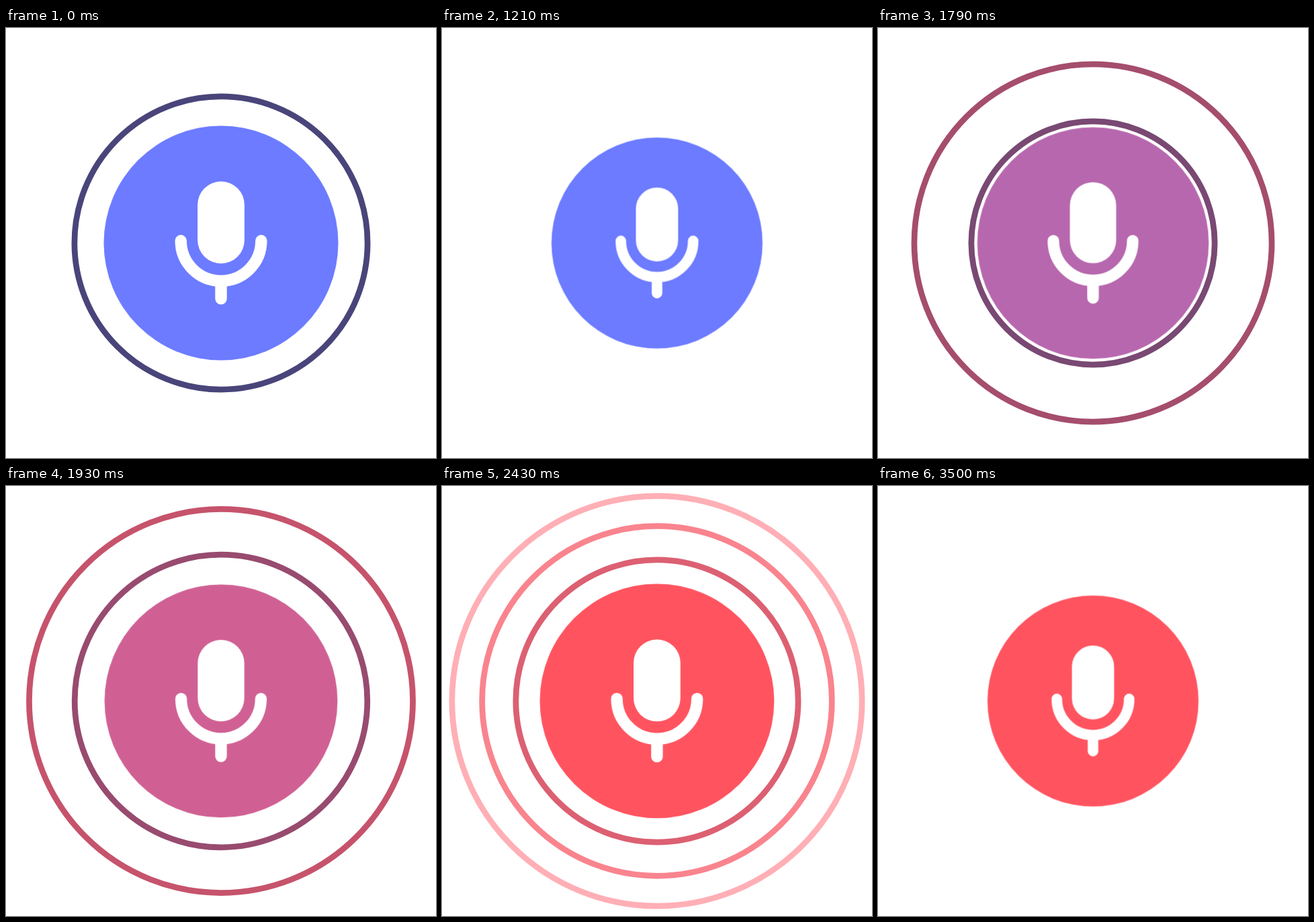
Recreate the animation shown at these times as an HTML page. Size 640 by 640 pixels, loop 3570 ms.

```html
<!DOCTYPE html>
<html lang="en">
<head>
<meta charset="utf-8">
<title>Voice button</title>
<style>
  :root {
    --blue: #6c7bff;
    --red: #ff5460;
    --navy: #49457a;
    --loop: 3570ms;
    --swift: cubic-bezier(.333, 0, 0, 1);
    --soft: cubic-bezier(.333, 0, .667, 1);
  }
  html, body {
    margin: 0;
    width: 100%;
    height: 100%;
    overflow: hidden;
    background: #fff;
  }
  svg {
    display: block;
    width: 100%;
    height: 100%;
  }

  /* Rings grow from behind the button, outermost first, then fall back. */
  .ring, .rest {
    fill: none;
    stroke: var(--navy);
    stroke-width: 8.73px;
    r: 0;
  }
  .ring {
    animation: wave var(--loop) var(--swift) var(--delay) infinite,
               tint var(--loop) var(--soft) var(--delay) infinite,
               fade var(--loop) var(--soft) var(--delay) infinite;
  }
  .outer  { --r: 305.4px; --delay: 1190ms; }
  .middle { --r: 261.8px; --delay: 1390ms; }
  .inner  { --r: 218.1px; --delay: 1592ms; }
  .rest   { animation: retract var(--loop) var(--swift) infinite; }

  .button {
    transform-origin: 320px 320px;
    animation: press var(--loop) var(--swift) infinite;
  }
  .disc {
    fill: var(--blue);
    animation: warm var(--loop) var(--soft) infinite;
  }
  .mic {
    fill: none;
    stroke: #fff;
    stroke-width: 17.45px;
    stroke-linecap: round;
  }

  @keyframes wave {
    0%, 67.5%, 100% { r: 0px; }
    33.333%, 34.2% { r: var(--r); }
  }
  @keyframes tint {
    0% { stroke: var(--navy); }
    33.333%, 100% { stroke: var(--red); }
  }
  @keyframes fade {
    0%, 17.4% { stroke-opacity: 1; }
    50.7%, 100% { stroke-opacity: 0; }
  }
  @keyframes retract {
    0% { r: 218.1px; }
    33.333%, 100% { r: 0px; }
  }
  @keyframes press {
    0%, 66.667% { transform: scale(1); }
    33.333%, 100% { transform: scale(.9); }
  }
  @keyframes warm {
    0%, 33.333% { fill: var(--blue); }
    66.667%, 100% { fill: var(--red); }
  }
</style>
</head>
<body>
<svg viewBox="0 0 640 640">
  <circle class="ring outer" cx="320" cy="320"/>
  <circle class="ring middle" cx="320" cy="320"/>
  <circle class="ring inner" cx="320" cy="320"/>
  <circle class="rest" cx="320" cy="320"/>
  <g class="button">
    <circle class="disc" cx="320" cy="320" r="174.5"/>
    <rect x="285.1" y="228.3" width="69.8" height="122.2" rx="34.9" fill="#fff"/>
    <path class="mic" d="M260.2 316.6a59.8 59.8 0 0 0 119.6 0M320 376.4V402.8"/>
  </g>
</svg>
</body>
</html>
```
